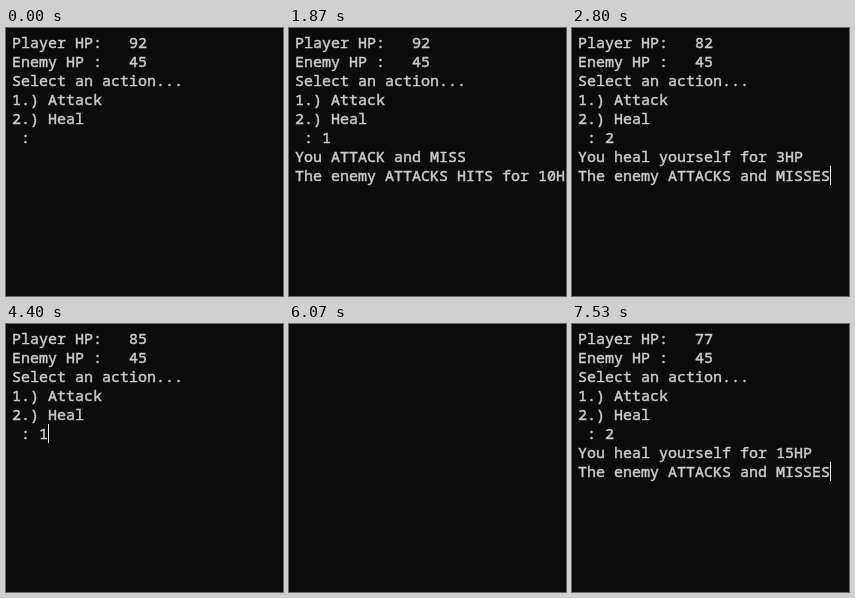
These frames come from a looping animation (277x268 px, 8 s). An HTML page:

```html
<!DOCTYPE html>
<html lang="en">
<head>
<meta charset="utf-8">
<title>Terminal battle</title>
<style>
  html, body { margin: 0; width: 100%; height: 100%; overflow: hidden; background: #0c0c0c; }
  svg { display: block; width: 277px; height: 268px; }
  text {
    font: 15px "Noto Sans Mono", "DejaVu Sans Mono", monospace;
    fill: #ccc; stroke: #ccc; stroke-width: 0.45px;
    white-space: pre; font-variant-ligatures: none;
  }
</style>
</head>
<body>
<svg viewBox="0 0 277 268">
  <rect width="277" height="268" fill="#0c0c0c"/>
  <g id="lines"></g>
  <rect id="cursor" width="1" height="19" fill="#f2f2f2"/>
</svg>
<script>
const LOOP = 8000, LEFT = 6, TOP = 5, CELL = 9, ROW = 19, BASE = 15;
const lines = document.getElementById('lines');
const cursor = document.getElementById('cursor');

const rows = Array.from({ length: 9 }, (_, i) => {
  const t = document.createElementNS('http://www.w3.org/2000/svg', 'text');
  t.setAttribute('x', LEFT);
  t.setAttribute('y', TOP + BASE + ROW * i);
  return lines.appendChild(t);
});

const menu = (hp, key = '') => [
  'Player HP:   ' + hp, 'Enemy HP :   45', 'Select an action...',
  '1.) Attack', '2.) Heal', ' : ' + key
];
const miss = 'You ATTACK and MISS';
const hits = n => `The enemy ATTACKS HITS for ${n}HP`;
const heals = n => `You heal yourself for ${n}HP`;
const enemyMiss = 'The enemy ATTACKS and MISSES';

// [start time, screen text, cursor shown]; the cursor follows the last character
const steps = [];
const show = (at, text, on = true) => steps.push([at, text, on]);
const blink = (...times) => {
  for (const at of times) {
    const [, text, on] = steps[steps.length - 1];
    show(at, text, !on);
  }
};

show(0, menu(92), false);
blink(330, 870);
show(1130, menu(92, 1));
show(1270, [...menu(92, 1), miss, hits(10), '']);
blink(1870);
show(2130, [''], false);
show(2200, menu(82));
show(2530, menu(82, 2));
show(2730, [...menu(82, 2), heals(3), '']);
show(2800, [...menu(82, 2), heals(3), enemyMiss]);
blink(3400, 3930);
show(4070, menu(85));
show(4400, menu(85, 1));
show(4670, [...menu(85, 1), miss, hits(8), '']);
blink(5270, 5800);
show(6070, [''], false);
show(6130, menu(77));
blink(6730, 7200);
show(7270, menu(77, 2));
show(7470, [...menu(77, 2), heals(15), '']);
show(7530, [...menu(77, 2), heals(15), enemyMiss]);

let current = null;
function draw(time) {
  const step = steps.findLast(s => s[0] <= time);
  if (step === current) return;
  current = step;
  const [, text, on] = step;
  rows.forEach((row, i) => row.textContent = text[i] || '');
  const last = text.length - 1;
  cursor.setAttribute('x', LEFT + CELL * text[last].length);
  cursor.setAttribute('y', TOP + ROW * last);
  cursor.setAttribute('visibility', on ? 'visible' : 'hidden');
}

const start = performance.now();
function tick() {
  draw((performance.now() - start) % LOOP);
  requestAnimationFrame(tick);
}
draw(0);
requestAnimationFrame(tick);
</script>
</body>
</html>
```
